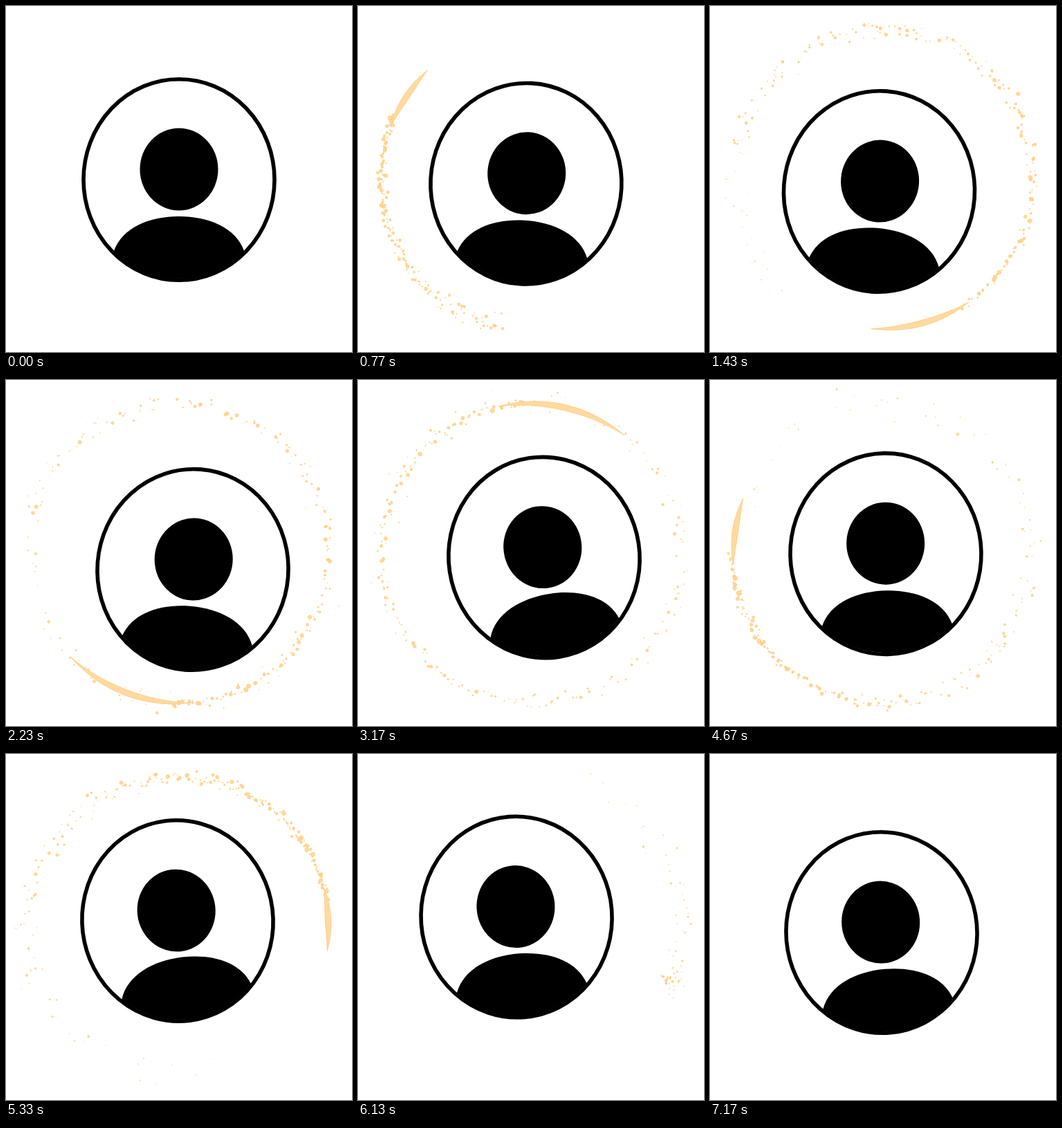
Recreate the animation shown at these times as an HTML page. Size 500 by 500 pixels, loop 7210 ms.

```html
<!DOCTYPE html>
<html lang="en">
<head>
<meta charset="utf-8">
<title>Avatar with paint ring</title>
<style>
  html, body { margin: 0; width: 100%; height: 100%; overflow: hidden; background: #fff; }
  svg { display: block; width: 100vw; height: 100vh; }
</style>
</head>
<body>
<svg viewBox="0 0 500 500">
  <g id="avatar">
    <ellipse rx="138" ry="145.3" fill="none" stroke="#000" stroke-width="5.6"/>
    <ellipse cy="-15" rx="56.5" ry="59.5"/>
    <path d="M-94 103C-82 69 -42 53 0 53S82 69 94 103A135 142 0 0 1 -94 103Z"/>
  </g>
  <g fill="#ffdaa0" stroke="#ffc978" stroke-width=".8" stroke-linejoin="round">
    <path id="drops"/>
    <path id="brush"/>
  </g>
</svg>
<script>
const LOOP = 7210, RADIUS = 217, CENTER = 250;
const BRUSH_START = 150, BRUSH_END = 5500, BRUSH_AGE = 95;
const [avatar, drops, brush] = ['avatar', 'drops', 'brush'].map(id => document.getElementById(id));

// time, x, y, tilt in degrees
const poses = [
  [0, 250, 251, 0], [300, 247, 248, 1], [730, 243, 256, 3], [1430, 244.5, 268, 4.2],
  [2230, 270, 274, 4.5], [3170, 269, 256.5, -8.6], [4030, 259, 259.5, 3],
  [5330, 248, 241, -7], [5900, 236, 237, -5], [6250, 227, 235, -4],
  [6600, 233, 235, -4], [7170, 248, 258, -5]
];
// time, angle of the brush tip in degrees, clockwise from the right
const orbit = [
  [150, 100], [730, 215], [1430, 454], [2230, 856], [3170, 1388],
  [4030, 1805], [5330, 2169], [5500, 2185]
];

// Smooth curve through the rows, for one column
function curve(rows, t, col) {
  const last = rows.length - 1;
  if (t <= rows[0][0]) return rows[0][col];
  if (t >= rows[last][0]) return rows[last][col];
  let i = 0;
  while (rows[i + 1][0] < t) i++;
  const slope = k => {
    const a = rows[Math.max(k - 1, 0)], b = rows[Math.min(k + 1, last)];
    return (b[col] - a[col]) / (b[0] - a[0]);
  };
  const [p, q] = [rows[i], rows[i + 1]];
  const span = q[0] - p[0], u = (t - p[0]) / span, v = 1 - u;
  return p[col] * v * v * (1 + 2 * u) + q[col] * u * u * (1 + 2 * v)
    + span * u * v * (slope(i) * v - slope(i + 1) * u);
}

let seed = 7;
function random() {
  seed = (seed + 0x6D2B79F5) | 0;
  let n = Math.imul(seed ^ seed >>> 15, seed | 1);
  n ^= n + Math.imul(n ^ n >>> 7, n | 61);
  return ((n ^ n >>> 14) >>> 0) / 4294967296;
}
const bell = () => random() + random() + random() - 1.5;

const particles = [];
for (let t = BRUSH_START; t < BRUSH_END; t += 3) {
  const born = t + random() * 3;
  particles.push({
    born,
    angle: curve(orbit, born, 1),
    offset: bell() * 4,
    spread: bell() * 24,
    swing: bell() * 5,
    life: 0.3 + 0.95 * random(),
    size: 0.6 + 2 * random() ** 2
  });
}

function point(angle, radius) {
  const a = angle * Math.PI / 180;
  return [CENTER + radius * Math.cos(a), CENTER + radius * Math.sin(a)];
}
const text = p => p.map(n => n.toFixed(1)).join(' ');

function dropPath(p, t) {
  const age = (t - p.born) / 1000;
  if (age < 0.075 || age > p.life) return '';
  const [x, y] = point(p.angle + p.swing * age, RADIUS + p.offset + p.spread * age);
  const r = p.size * (1 - (age / p.life) ** 3) * (1 + 0.4 * Math.exp(-age * 4));
  if (r < 0.2) return '';
  const d = (2 * r).toFixed(2), s = r.toFixed(2);
  return `M${text([x - r, y])}a${s} ${s} 0 1 0 ${d} 0a${s} ${s} 0 1 0 -${d} 0z`;
}

function brushPath(t) {
  const tip = Math.min(t, BRUSH_END), tail = Math.max(t - BRUSH_AGE, BRUSH_START);
  if (tip <= tail) return '';
  const from = curve(orbit, tail, 1), to = curve(orbit, tip, 1);
  const outer = [], inner = [], steps = 28;
  for (let i = 0; i <= steps; i++) {
    const s = i / steps, angle = from + (to - from) * s;
    const half = 4.2 * Math.sin(Math.PI * s) + 0.4 * Math.sin(angle * 2.3) * s * (1 - s);
    outer.push(text(point(angle, RADIUS + half * 0.7)));
    inner.unshift(text(point(angle, RADIUS - half * 1.3)));
  }
  return `M${outer.concat(inner).join('L')}Z`;
}

function draw(t) {
  const [x, y, tilt] = [1, 2, 3].map(col => curve(poses, t, col).toFixed(2));
  avatar.setAttribute('transform', `translate(${x} ${y}) rotate(${tilt})`);
  drops.setAttribute('d', particles.map(p => dropPath(p, t)).join(''));
  brush.setAttribute('d', brushPath(t));
}

const start = performance.now();
function tick() {
  draw((performance.now() - start) % LOOP);
  requestAnimationFrame(tick);
}
tick();
</script>
</body>
</html>
```
